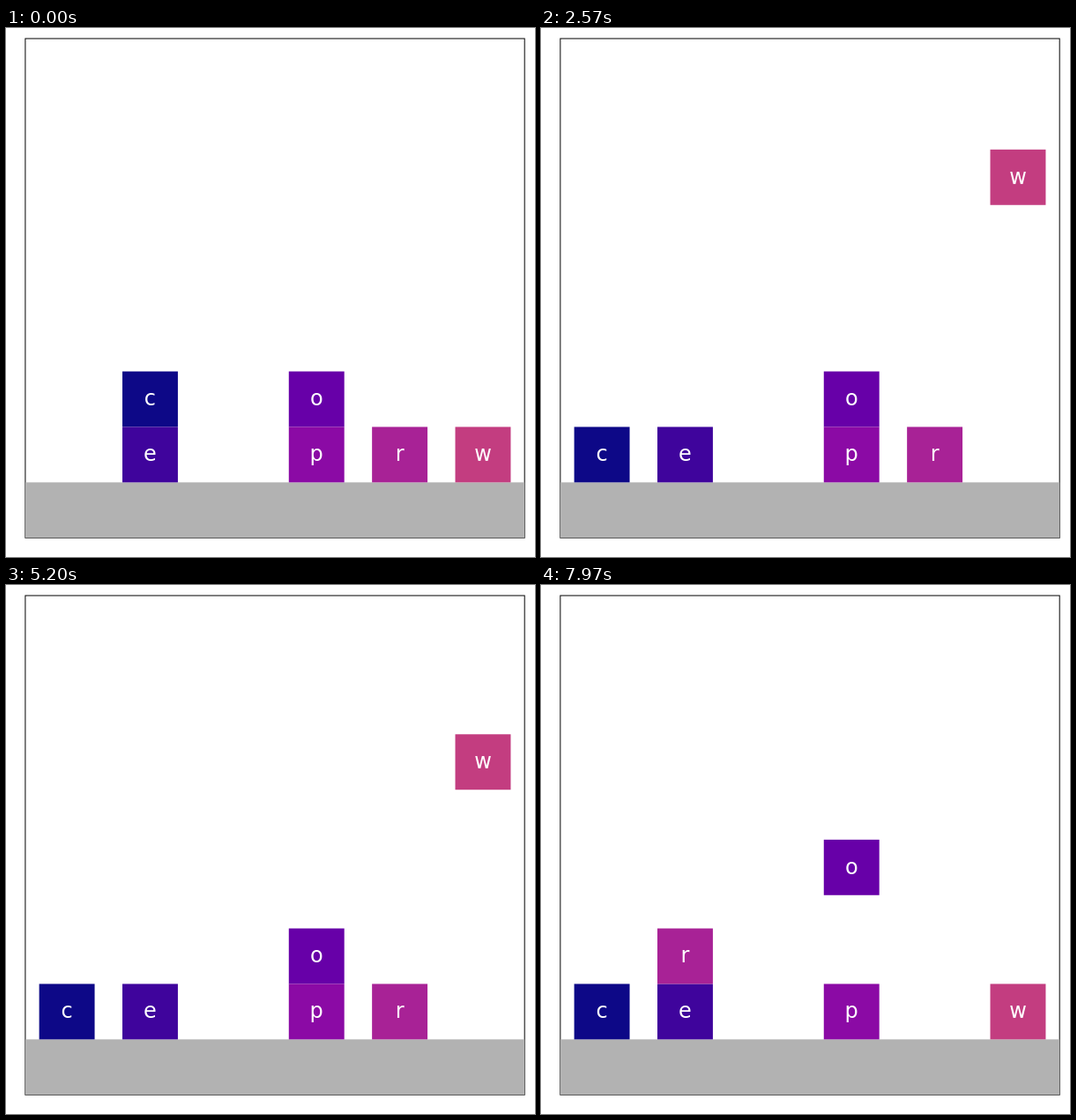
An HTML page with a canvas for the animation above (8 s loop, 600 px wide and 600 px high).

```html
<!DOCTYPE html>
<html lang="en">
<head>
<meta charset="utf-8">
<title>Stacking blocks</title>
<style>
html, body { margin: 0; width: 100%; height: 100%; overflow: hidden; background: #fff; }
canvas { display: block; }
</style>
</head>
<body>
<canvas id="stage" width="600" height="600"></canvas>
<script>
const ctx = document.getElementById('stage').getContext('2d');
const UNIT = 62.92, LEFT = 21.9, TOP = 12, SIZE = 9 * UNIT;
const GROUND = TOP + 8 * UNIT;
const LIFT = 5, FPS = 30, ACTION = 29, LOOP = 8000;

// name: [colour, column, level]
const blocks = {
  c: ['#0d0887', 1, 1],
  e: ['#3f049c', 1, 0],
  o: ['#6700a8', 3, 1],
  p: ['#8b0aa5', 3, 0],
  r: ['#a82296', 4, 0],
  w: ['#c33d80', 5, 0]
};

// block, target column, target level
const moves = [['c', 0, 0], ['w', 1, 1], ['w', 5, 0], ['r', 1, 1], ['o', 3, 1]];

const clamp = v => Math.min(1, Math.max(0, v));
const mix = (a, b, t) => a + (b - a) * t;

// Each move is a pick (rise, hold) followed by a place (slide, descend).
function pose(frame) {
  const at = {};
  for (const name in blocks) at[name] = blocks[name].slice(1);
  moves.forEach(([name, col, level], i) => {
    const step = frame - i * 2 * ACTION;
    if (step <= 0) return;
    const [col0, level0] = at[name];
    if (step <= ACTION) {
      at[name] = [col0, mix(level0, LIFT, clamp((step + 1) / 20))];
    } else {
      const k = step - ACTION + 1;
      at[name] = [mix(col0, col, clamp(k / 10)), mix(LIFT, level, clamp((k - 10) / 20))];
    }
  });
  return at;
}

function draw(frame) {
  ctx.fillStyle = '#fff';
  ctx.fillRect(0, 0, 600, 600);
  ctx.strokeStyle = '#000';
  ctx.lineWidth = 1;
  ctx.strokeRect(LEFT, TOP, SIZE, SIZE);
  ctx.fillStyle = '#b2b2b2';
  ctx.fillRect(LEFT, GROUND, SIZE, UNIT);

  ctx.font = '24px "DejaVu Sans", sans-serif';
  ctx.textAlign = 'center';
  const at = pose(frame);
  for (const name in blocks) {
    const [col, level] = at[name];
    const x = LEFT + (0.25 + 1.5 * col) * UNIT;
    const y = GROUND - (level + 1) * UNIT;
    ctx.fillStyle = blocks[name][0];
    ctx.fillRect(x, y, UNIT, UNIT);
    ctx.fillStyle = '#fff';
    ctx.fillText(name, x + UNIT / 2, y + UNIT / 2 + 7.5);
  }
}

const start = performance.now();
function tick() {
  const t = (performance.now() - start) % LOOP;
  // The small offset matches frame times rounded to 10 ms.
  draw(Math.min(239, Math.floor(t * FPS / 1000 + 0.15)));
  requestAnimationFrame(tick);
}
tick();
</script>
</body>
</html>
```
